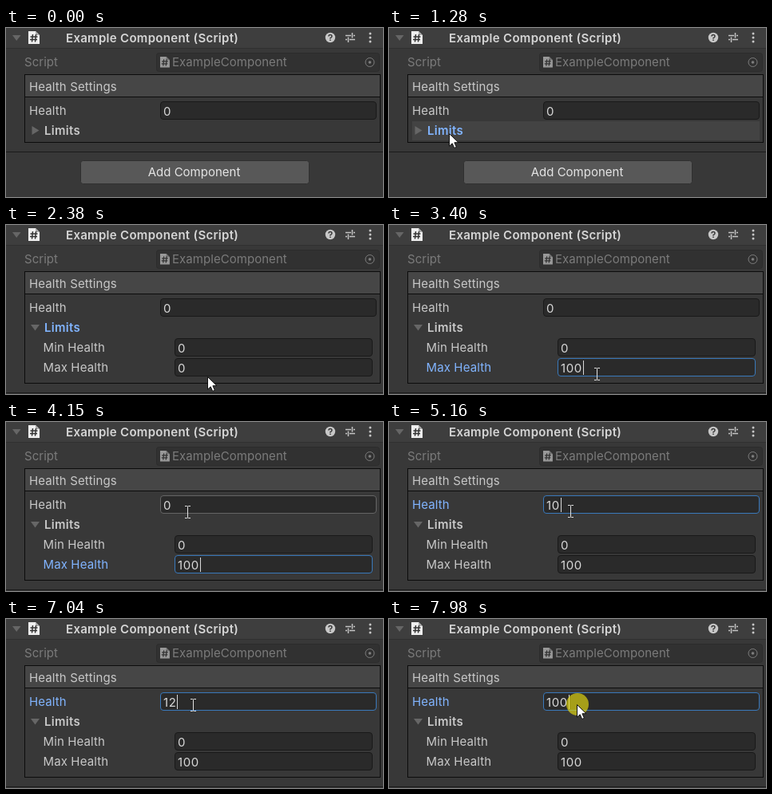
Recreate the animation shown at these times as an HTML page. Size 472x212 px, loop 8 s.

```html
<!DOCTYPE html>
<html lang="en">
<head>
<meta charset="utf-8">
<title>Inspector</title>
<style>
  html, body { margin: 0; width: 100%; height: 100%; overflow: hidden; background: #383838; }
  svg { display: block; width: 472px; height: 212px; }
  text { font: 15px Inter, "Open Sans", sans-serif; letter-spacing: .12px; fill: #c8c8c8; white-space: pre; }
  .bold { font-weight: 600; letter-spacing: .3px; }
  .value { letter-spacing: .6px; fill: #d8d8d8; }
  .dim { letter-spacing: .05px; fill: #7b7b7b; }
  .caption { letter-spacing: 0; fill: #e4e4e4; }
  .line { fill: none; stroke: #c4c4c4; stroke-width: 1.5; }
</style>
</head>
<body>
<svg viewBox="0 0 472 212">
  <defs>
    <g id="script">
      <path d="M0 0H9L14 5V16H0Z" fill="#eee"/>
      <path d="M9 0V5H14Z" fill="#a8a8a8"/>
      <path d="M5.5 4L4.5 13.5M9.5 4L8.5 13.5M2.5 7H11.5M2 10.5H11" stroke="#333" stroke-width="1.5" fill="none"/>
    </g>
  </defs>
  <rect width="472" height="212" fill="#383838"/>

  <!-- component header -->
  <rect width="472" height="25" fill="#3e3e3e"/>
  <rect y="25" width="472" height="1" fill="#303030"/>
  <path d="M8 9H18.5L13.2 16Z" fill="#666"/>
  <use href="#script" x="28" y="4"/>
  <text class="bold" x="75" y="17.5" style="fill:#d6d6d6">Example Component (Script)</text>
  <circle cx="406" cy="12" r="6.2" fill="#c8c8c8"/>
  <path d="M404 10.6Q404 8.6 406 8.6T408 10.4Q408 11.5 406 12.6V13.4M406 14.6V16" fill="none" stroke="#3a3a3a" stroke-width="1.5"/>
  <path class="line" d="M425 9.5H432M435 9.5H437M425 14.5H427M430 14.5H437M433.5 6V12.5M428.5 11.5V18"/>
  <g fill="#c8c8c8"><circle cx="456" cy="7" r="1.5"/><circle cx="456" cy="12" r="1.5"/><circle cx="456" cy="17" r="1.5"/></g>

  <!-- script reference -->
  <text class="dim" x="23" y="48">Script</text>
  <rect x="188.5" y="31.5" width="279" height="23" rx="3" fill="#313131" stroke="#2c2c2c"/>
  <use href="#script" transform="translate(193 36) scale(.85)" opacity=".55"/>
  <text class="dim" x="208" y="48">ExampleComponent</text>
  <circle cx="455.5" cy="43" r="5.5" fill="none" stroke="#7d7d7d"/>
  <circle cx="455.5" cy="43" r="1.8" fill="#7d7d7d"/>

  <!-- settings group -->
  <rect x="24" y="59" width="444" height="27" fill="#464646"/>
  <text x="29" y="79">Health Settings</text>
  <path d="M24 86.5H468" stroke="#0c0c0c"/>
  <rect id="hover" x="29" y="117" width="435" height="24" fill="#434343"/>
  <rect id="box" x="23.5" y="58.5" width="445" fill="none" stroke="#0c0c0c"/>
  <path id="fold" fill="#666"/>
  <text id="limits" class="bold" x="48" y="134">Limits</text>
  <g id="fields"></g>

  <rect id="divider" width="472" height="1" fill="#1a1a1a"/>
  <g id="button">
    <rect x="93.5" y="166.5" width="286" height="29" rx="3" fill="#585858" stroke="#303030"/>
    <text class="caption" x="235.5" y="186" text-anchor="middle">Add Component</text>
  </g>

  <!-- pointer -->
  <g id="pointer">
    <circle id="halo" r="14" fill="#e6dc10" opacity=".66"/>
    <path id="arrow" d="M-.5 .5V16.2L3.2 12.8L5.7 18.5L8.4 17.3L5.9 11.7H11Z" fill="#fff" stroke="#111"/>
    <path id="beam" d="M-3.5 -7.5H-1Q0 -7.5 0 -6.5V6.5Q0 7.5 -1 7.5H-3.5M3.5 -7.5H1Q0 -7.5 0 -6.5M0 6.5Q0 7.5 1 7.5H3.5" fill="none" stroke="#e2e2e2"/>
  </g>
</svg>
<script>
const LOOP = 8000, BLINK = 365;
const BLUE = '#81b4ff', TEXT = '#c8c8c8';
const $ = id => document.getElementById(id);
const set = (el, attrs) => { for (const k in attrs) el.setAttribute(k, attrs[k]); };
const show = (el, on) => { el.style.display = on ? '' : 'none'; };

// Timed steps: [start, value]
const focusSteps = [[0, ''], [1150, 'limits'], [2570, 'max'], [4400, 'health']];
const values = {
  health: [[0, '0'], [4890, '1'], [5160, '10'], [5350, '100'], [6670, '1'], [7040, '12'], [7190, '100']],
  min: [[0, '0']],
  max: [[0, '0'], [3020, '1'], [3210, '10'], [3400, '100']]
};
// Spans: [start, end]
const clicks = [[1150, 1260], [2570, 2680], [4380, 4500], [6070, 6170], [6250, 6360], [7930, LOOP]];
const selections = [[2570, 3020], [4400, 4890], [6250, 6670]];
// Pointer moves: [start, end, x, y]
const origin = [153, 177];
const moves = [
  [490, 1130, 76, 132], [1570, 2370, 253, 190], [2390, 2540, 260, 186.5],
  [3410, 4150, 227.5, 112.5], [4200, 4240, 227.5, 111.5],
  [5920, 6060, 234.5, 107.5], [7380, 7550, 236, 107.5]
];
const OPEN_AT = 1330, POINTER_AT = 490;

const stepAt = (steps, t) => steps.filter(s => s[0] <= t).pop();
const within = (spans, t) => spans.some(([a, b]) => t >= a && t < b);
const ease = p => p * p * (3 - 2 * p);

function pointerAt(t) {
  let [x, y] = origin;
  for (const [a, b, tx, ty] of moves) {
    if (t < a) break;
    const p = ease(Math.min(1, (t - a) / (b - a)));
    x += (tx - x) * p;
    y += (ty - y) * p;
  }
  return [x, y];
}

function makeField(id, label, labelX, x, y, right) {
  const g = document.createElementNS('http://www.w3.org/2000/svg', 'g');
  g.innerHTML = `<text x="${labelX}" y="${y + 17}">${label}</text>
    <rect x="${x + .5}" y="${y + .5}" width="${right - x - 1}" height="22" rx="3.5" fill="#2a2a2a"/>
    <rect x="${x + 4}" y="${y + 3}" width="10" height="18" fill="#3b6ea8"/>
    <text class="value" x="${x + 4}" y="${y + 17.5}"></text>
    <rect y="${y + 3}" width="1" height="18" fill="#d8d8d8"/>`;
  $('fields').append(g);
  const [name, frame, selection, value, caret] = g.children;
  return { id, x, y, right, g, name, frame, selection, value, caret };
}

const fields = [
  makeField('health', 'Health', 29, 193, 92, 464),
  makeField('min', 'Min Health', 46.5, 211, 142, 459),
  makeField('max', 'Max Health', 46.5, 211, 167, 459)
];

function drawField(f, t, focus, px, py, open) {
  const visible = open || f.id === 'health';
  const focused = focus === f.id;
  const selected = focused && within(selections, t);
  const hovered = visible && px >= f.x && px < f.right && py >= f.y && py < f.y + 23;
  const [typedAt, text] = stepAt(values[f.id], t);
  const clickedAt = (stepAt(clicks, t) || [0])[0];
  const since = t - Math.max(typedAt, clickedAt);
  const textX = f.x + 4;
  const caretX = textX + 10 * text.length - 2 - text.includes('2');

  show(f.g, visible);
  f.name.style.fill = focused ? BLUE : TEXT;
  set(f.frame, { stroke: focused ? '#3a79bb' : hovered ? '#656565' : '#191919' });
  show(f.selection, selected);
  set(f.selection, { width: text === '0' ? 10 : caretX - textX });
  if (f.value.textContent !== text) f.value.textContent = text;
  show(f.caret, focused && !selected && since % (2 * BLINK) < BLINK);
  set(f.caret, { x: caretX });
  return hovered;
}

function draw(t) {
  const open = t >= OPEN_AT;
  const focus = stepAt(focusSteps, t)[1];
  const [x, y] = pointerAt(t);
  const present = t >= POINTER_AT;
  const onLimits = present && y >= 117 && y < 141;

  set($('box'), { height: open ? 140 : 85 });
  set($('divider'), { y: open ? 210 : 155 });
  show($('button'), !open);
  show($('hover'), onLimits);
  set($('fold'), { d: open ? 'M31 125H42L36.5 132.5Z' : 'M32.5 123V134L41.5 128.5Z' });
  $('limits').style.fill = focus === 'limits' ? BLUE : TEXT;

  const overField = fields.map(f => drawField(f, t, focus, x, y, open)).some(Boolean);
  const pressed = within(clicks, t);
  const beam = overField && !pressed;
  show($('pointer'), present);
  show($('halo'), pressed);
  show($('arrow'), !beam);
  show($('beam'), beam);
  const snap = v => beam ? Math.floor(v) + .5 : Math.round(v);
  set($('pointer'), { transform: `translate(${snap(x)} ${beam ? Math.round(y) : Math.floor(y)})` });
}

function tick() {
  draw(performance.now() % LOOP);
  requestAnimationFrame(tick);
}
tick();
</script>
</body>
</html>
```
